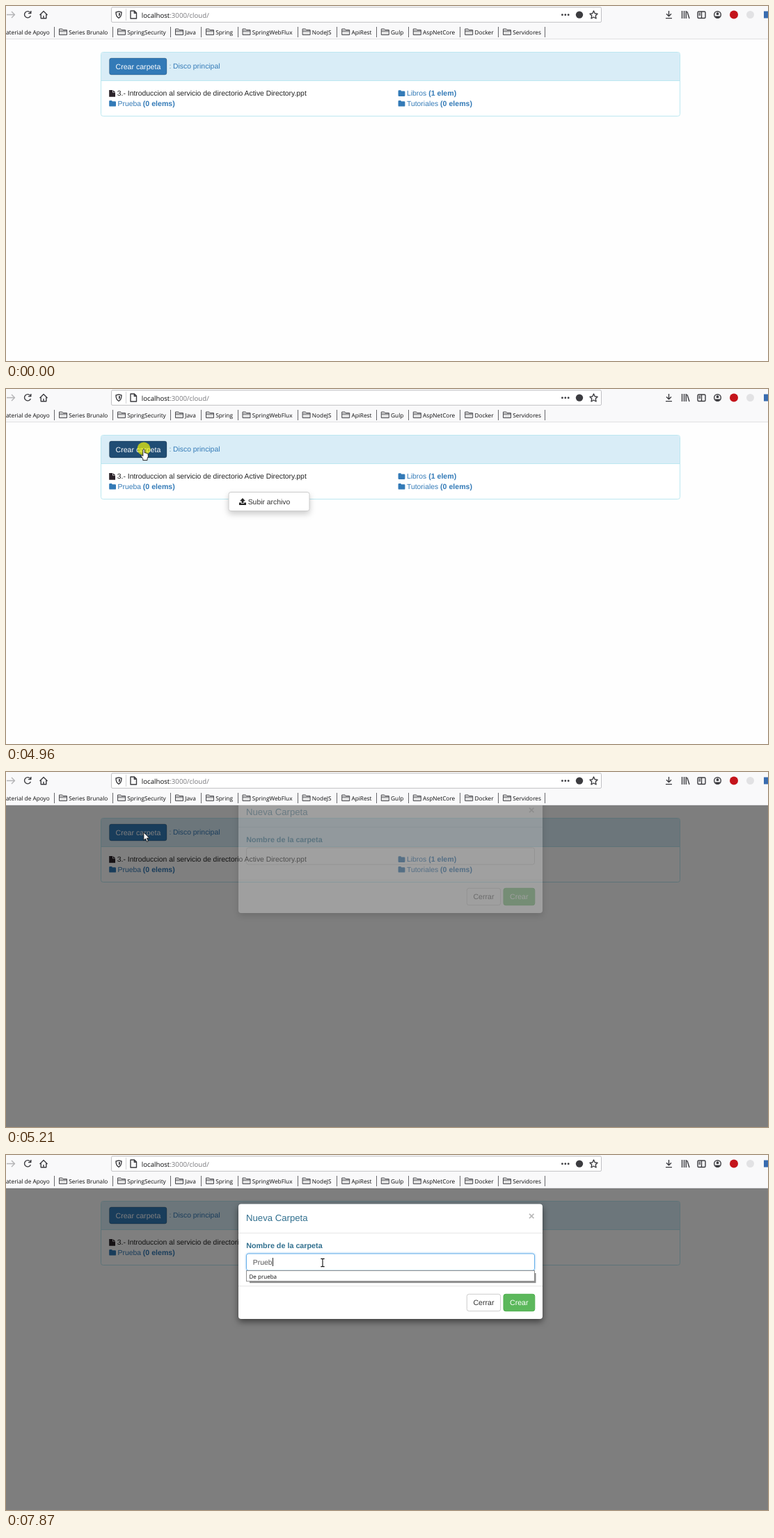
An HTML page that plays this animation: 1095x511 px, repeating every 8 s.

```html
<!DOCTYPE html>
<html lang="es">
<head>
<meta charset="utf-8">
<title>Disco principal</title>
<style>
  html, body { margin: 0; height: 100%; overflow: hidden; background: #fefefe; }
  svg { display: block; width: 100vw; height: 100vh; }
  text { font: 10.38px "Liberation Sans", Arial, sans-serif; text-rendering: geometricPrecision; white-space: pre; }
  .ui { font: 8.3px "Open Sans", "Noto Sans", sans-serif; fill: #0c0c0d; }
  .url { font-size: 9.67px; }
  .bold { font-size: 10.6px; font-weight: bold; }
  .btn { font-size: 10.6px; }
  .link { fill: #337ab7; }
  .link.hover { fill: #23527c; }
  .link.hover text { text-decoration: underline; }
  .icon { fill: none; stroke: #3c3c40; stroke-width: 1.4; stroke-linejoin: round; }
  .info { fill: #31708f; }
  #menu { filter: drop-shadow(0 4px 4px rgba(0,0,0,.2)); }
  #sheet { filter: drop-shadow(0 4px 5px rgba(0,0,0,.5)); }
  #field.focus { stroke: #66afe9; filter: drop-shadow(0 0 1.5px rgba(102,175,233,.7)); }
  #pointer path { stroke-linejoin: round; }
</style>
</head>
<body>
<svg viewBox="0 0 1095 511">
  <defs>
    <path id="folder" d="M0 1.3Q0 0 1.3 0H3.3Q4.4 0 4.4 1.3H8.6Q9.8 1.3 9.8 2.5V7.4Q9.8 8.6 8.6 8.6H1.3Q0 8.6 0 7.4Z"/>
    <g id="mark" stroke="#4a4a4f">
      <path d="M.5 9V.5H4.8L6 2H11.5V9Z" fill="#e2e2e2"/>
      <path d="M.5 3.6H11.5" fill="none"/>
    </g>
  </defs>

  <rect width="1095" height="511" fill="#fefefe"/>

  <g id="page">
    <rect x="136.5" y="66.5" width="832" height="92" rx="3" fill="#fff" stroke="#bce8f1"/>
    <path d="M137 107V69.5Q137 67 139.5 67H965.5Q968 67 968 69.5V107Z" fill="#d9edf7"/>
    <path d="M137 107.5H968" stroke="#bce8f1"/>
    <rect id="create" x="148.5" y="75" width="82.5" height="24" rx="3" stroke="#000" stroke-opacity=".2"/>
    <text class="btn" x="157.5" y="90.5" fill="#fff">Crear carpeta</text>
    <text class="info" x="234.5" y="90" opacity=".7">:</text>
    <text class="link" x="240" y="90">Disco principal</text>

    <path d="M148.2 121H153V124.6H157V130.8H148.2ZM153.8 121L157 124V124H153.8Z" fill="#2a2229"/>
    <text x="159.8" y="129.3" fill="#222">3.- Introduccion al servicio de directorio Active Directory.ppt</text>
    <g id="prueba" class="link">
      <use href="#folder" x="148.2" y="136"/>
      <text x="160.5" y="144">Prueba <tspan class="bold">(0 elems)</tspan></text>
    </g>
    <g class="link">
      <use href="#folder" x="563.6" y="121.3"/>
      <text x="576" y="129.3">Libros <tspan class="bold">(1 elem)</tspan></text>
      <use href="#folder" x="563.6" y="136"/>
      <text x="576" y="144">Tutoriales <tspan class="bold">(0 elems)</tspan></text>
    </g>
  </g>

  <g id="menu">
    <rect x="320" y="148.5" width="116" height="27" rx="3" fill="#fff" stroke="#ccc"/>
    <rect id="item" x="320.5" y="153" width="115" height="18" fill="#f5f5f5"/>
    <path d="M340 157L344 161.2H341.4V164.2H338.6V161.2H336ZM335 163.4H337.8V165H342.2V163.4H345V167H335Z" fill="#262626"/>
    <text x="347.7" y="165.6" fill="#333">Subir archivo</text>
  </g>

  <rect id="backdrop" y="48" width="1095" height="463"/>

  <g id="modal">
    <rect id="sheet" x="334" y="70.5" width="437" height="165.5" rx="4" fill="#fff"/>
    <path d="M334 112.3H771M334 188.7H771" stroke="#e5e5e5"/>
    <text class="info" x="345" y="95.4" style="font-size:13.17px">Nueva Carpeta</text>
    <text x="755.3" y="93" text-anchor="middle" fill="#b8b8b8" style="font-size:15.3px;font-weight:bold">×</text>
    <text class="info bold" x="345.2" y="134.4" style="font-size:10.77px">Nombre de la carpeta</text>
    <rect id="field" x="345.5" y="142" width="414" height="24.2" rx="3" fill="#fff" stroke="#ccc"/>
    <text id="typed" x="354.8" y="157.8" fill="#555"></text>
    <rect id="caret" y="148" width="1" height="12" fill="#222"/>
    <rect x="662.3" y="200.3" width="48.4" height="24.4" rx="3" fill="#fff" stroke="#ccc"/>
    <text class="btn" x="671.4" y="216.3" fill="#333">Cerrar</text>
    <rect x="715" y="200.3" width="44.8" height="24.4" rx="3" fill="#5cb85c" stroke="#4cae4c"/>
    <text class="btn" x="724" y="216.3" fill="#fff">Crear</text>
    <g id="hints">
      <rect id="shade" x="350" y="170" width="411.5" fill="#8c8c8c"/>
      <rect id="list" x="345.5" y="166.5" width="414" fill="#fff" stroke="#8f8f8f"/>
      <g id="rows"></g>
    </g>
  </g>

  <g id="browser">
    <rect width="1095" height="47.5" fill="#f9f9fa"/>
    <path d="M0 47.5H1095" stroke="#e0e0e2"/>
    <path class="icon" d="M1 12.5H12M8 8L12.5 12.5L8 17" style="stroke:#b4b4b6"/>
    <path class="icon" d="M35 9.7A4.6 4.6 0 1 0 35.4 14M35.8 7V10.6H32"/>
    <path class="icon" d="M48.5 13L54 7.5L59.5 13M50.2 12V17.8H57.8V12M54 18V14"/>
    <rect x="151.5" y="1.9" width="704" height="21.4" rx="1.5" fill="#fff" stroke="#c0c0c3"/>
    <path class="icon" d="M162 7.8L166 9C166 13.5 165 15.7 162 17.3C159 15.7 158 13.5 158 9Z" stroke-width="1.2"/>
    <path d="M162 9.8V15C163.6 14 164 12.5 164 10.5Z" fill="#3c3c40"/>
    <path d="M172.5 4V21" stroke="#d4d4d6"/>
    <path class="icon" d="M179 7H184.5L187.5 10V18H179ZM184.3 7V10.3H187.5"/>
    <text class="ui url" x="194.8" y="16.7">localhost<tspan fill="#77777b">:3000/cloud/</tspan></text>
    <g fill="#3c3c40">
      <circle cx="799.4" cy="12.7" r="1.4"/><circle cx="803.8" cy="12.7" r="1.4"/><circle cx="808.2" cy="12.7" r="1.4"/>
      <circle cx="824" cy="12.6" r="5.2"/>
    </g>
    <path class="icon" d="M844.5 7L846.2 10.8L850 11.2L847.2 13.9L848 18L844.5 16L841 18L841.8 13.9L839 11.2L842.8 10.8Z" stroke-width="1.2"/>
    <path class="icon" d="M952.5 7V14.5M949 11.3L952.5 14.8L956 11.3M948 17.6H957"/>
    <path class="icon" d="M971.5 7V18M974.5 7V18M977.3 7V18M978.8 8L982 18"/>
    <rect class="icon" x="994" y="8" width="11" height="9.5" rx="1.5"/>
    <path class="icon" d="M999.5 8V17.5M995.5 10.5H998M995.5 12.8H998"/>
    <circle class="icon" cx="1022.5" cy="12.5" r="4.8"/>
    <path d="M1018.6 14.5H1026.4Q1025 17.5 1022.5 17.5T1018.6 14.5Z" fill="#3c3c40"/>
    <circle cx="1022.5" cy="11.2" r="1.9" fill="#3c3c40"/>
    <circle cx="1046" cy="12.5" r="6" fill="#c4141b"/>
    <circle cx="1069.5" cy="12.5" r="5.5" fill="#e2e2e4"/>
    <rect x="1089" y="7.5" width="10" height="10" fill="#386cb0"/>
    <text class="ui" x="62.8" y="41" text-anchor="end">Material de Apoyo</text>
    <g id="marks"></g>
  </g>

  <g id="pointer">
    <circle id="press" r="9.5" fill="#ffff00" fill-opacity=".66"/>
    <path id="arrow" d="M.4.4V11.8L3 9.4L4.9 13.8L6.8 13L4.9 8.7H8.4Z" fill="#fff" stroke="#111" stroke-width=".9"/>
    <path id="hand" d="M-1.2 1.3Q0 -.3 1.2 1.3V6Q2.4 5.2 3.2 6.4Q4.4 5.8 5 7Q6.3 6.7 6.3 8.2V11.5L5 14.2V16.6H-1.2V14.6L-3.8 10.6Q-4.2 8.6 -2.6 9.2L-1.2 10.4Z" fill="#fff" stroke="#111" stroke-width=".9"/>
    <path id="beam" d="M-2.6 -5.6H-.6L0 -5L.6 -5.6H2.6M0 -5V5M-2.6 5.6H-.6L0 5L.6 5.6H2.6" fill="none" stroke="#111" stroke-width="1.1"/>
  </g>
</svg>
<script>
const LOOP = 8000;
const $ = id => document.getElementById(id);
const show = (id, on) => $(id).setAttribute('visibility', on ? 'inherit' : 'hidden');
const set = (id, attr, value) => $(id).setAttribute(attr, value);
const within = (t, from, to) => t >= from && t < to;

// Value of the last entry [time, ...values] reached at t.
const at = (track, t) => track.findLast(k => k[0] <= t).slice(1);

const bookmarks = {
  'Series Brunalo': 76, SpringSecurity: 160, Java: 243, Spring: 287, SpringWebFlux: 339.5,
  NodeJS: 425.6, ApiRest: 482.2, Gulp: 538.8, AspNetCore: 584.8, Docker: 659.2, Servidores: 714
};
const bar = x => `<path d="M${x} 30V45" stroke="#68686c"/>`;
$('marks').innerHTML = Object.entries(bookmarks).map(([name, x]) =>
  bar(Math.round(x - 7) + .5) + `<use href="#mark" x="${x}" y="32.5"/><text class="ui" x="${x + 14.2}" y="41">${name}</text>`
).join('') + bar(774.5);

const cursor = [
  [0, -50, -50, 'arrow'], [70, 559, 334, 'arrow'], [130, 286, 203, 'arrow'],
  [280, 308, 182, 'arrow'], [360, 296, 168, 'arrow'], [440, 274, 160, 'arrow'], [520, 252, 152, 'arrow'],
  [590, 232, 146, 'hand'], [670, 214, 144, 'hand'], [750, 203, 143, 'hand'], [830, 197, 142, 'hand'], [1060, 193, 141, 'hand'],
  [2070, 212, 143, 'hand'], [2150, 240, 145, 'hand'], [2220, 270, 147, 'arrow'], [2300, 294, 147, 'arrow'],
  [2470, 298, 147, 'arrow'], [2550, 306, 147, 'arrow'], [2630, 314, 147, 'arrow'], [2710, 320, 148, 'arrow'],
  [2790, 323, 148, 'arrow'], [3490, 322, 148, 'arrow'],
  [4180, 326, 151, 'arrow'], [4260, 334, 157, 'hand'], [4340, 342, 162, 'hand'], [4420, 346, 163, 'hand'],
  [4570, 330, 157, 'hand'], [4650, 300, 140, 'arrow'], [4730, 255, 112, 'arrow'], [4810, 220, 94, 'hand'],
  [4890, 198, 86, 'hand'], [5030, 197.5, 86.5, 'arrow'],
  [5290, 215, 92, 'arrow'], [5360, 260, 108, 'arrow'], [5440, 345, 150, 'arrow'], [5520, 422, 181, 'arrow'],
  [5600, 450, 165, 'arrow'], [5670, 455, 146, 'beam'], [5820, 455, 145, 'beam'], [6060, 455, 155, 'beam']
];
const button = [[0, '#337ab7'], [4810, '#286090'], [4960, '#204d74'], [5030, '#337ab7']];
const dim = [[0, 0], [5030, .1], [5120, .4], [5210, .5]];
const dialog = [[0, 0, -41], [5210, .26, -33], [5290, .8, -18], [5360, 1, -8], [5440, 1, -3], [5520, 1, 0]];
const typing = [[0, ''], [7300, 'P'], [7540, 'Pr'], [7700, 'Pru'], [7780, 'Prue'], [7870, 'Prueb']];
const lookup = [[0, ''], [7390, 'p'], [7620, 'pr'], [7700, 'pru']];
const entries = ['De prueba', 'Principal', 'Imprimir', 'Apoyo', 'Copias', 'Tipos'];

function drawHints(query) {
  const found = query ? entries.filter(e => e.toLowerCase().includes(query)) : [];
  const height = found.length * 14.4 + .8;
  show('hints', found.length);
  set('list', 'height', height);
  set('shade', 'height', height - 1);
  $('rows').innerHTML = found.map((e, i) =>
    `<text class="ui" x="349.5" y="${177.5 + i * 14.4}" style="font-size:8.05px">${e}</text>`).join('');
}

let lastQuery = null;
function draw() {
  const t = performance.now() % LOOP;

  const [x, y, kind] = at(cursor, t);
  set('pointer', 'transform', `translate(${x} ${y})`);
  for (const k of ['arrow', 'hand', 'beam']) show(k, k === kind);
  show('press', within(t, 3780, 3940) || within(t, 4960, 5030) || within(t, 5820, 5980));

  $('prueba').classList.toggle('hover', within(t, 590, 2220));
  show('menu', within(t, 3940, 5030));
  show('item', within(t, 4260, 4650));
  set('create', 'fill', at(button, t)[0]);

  set('backdrop', 'opacity', at(dim, t)[0]);
  const [alpha, dy] = at(dialog, t);
  set('modal', 'opacity', alpha);
  set('modal', 'transform', `translate(0 ${dy})`);

  const [text] = at(typing, t);
  $('typed').textContent = text;
  $('field').classList.toggle('focus', t >= 5900);
  set('caret', 'x', text ? Math.round(355 + $('typed').getComputedTextLength()) : 355);
  show('caret', within(t, 5900, 6460) || t >= 7000);

  const [query] = at(lookup, t);
  if (query !== lastQuery) drawHints(lastQuery = query);
  requestAnimationFrame(draw);
}
draw();
</script>
</body>
</html>
```
